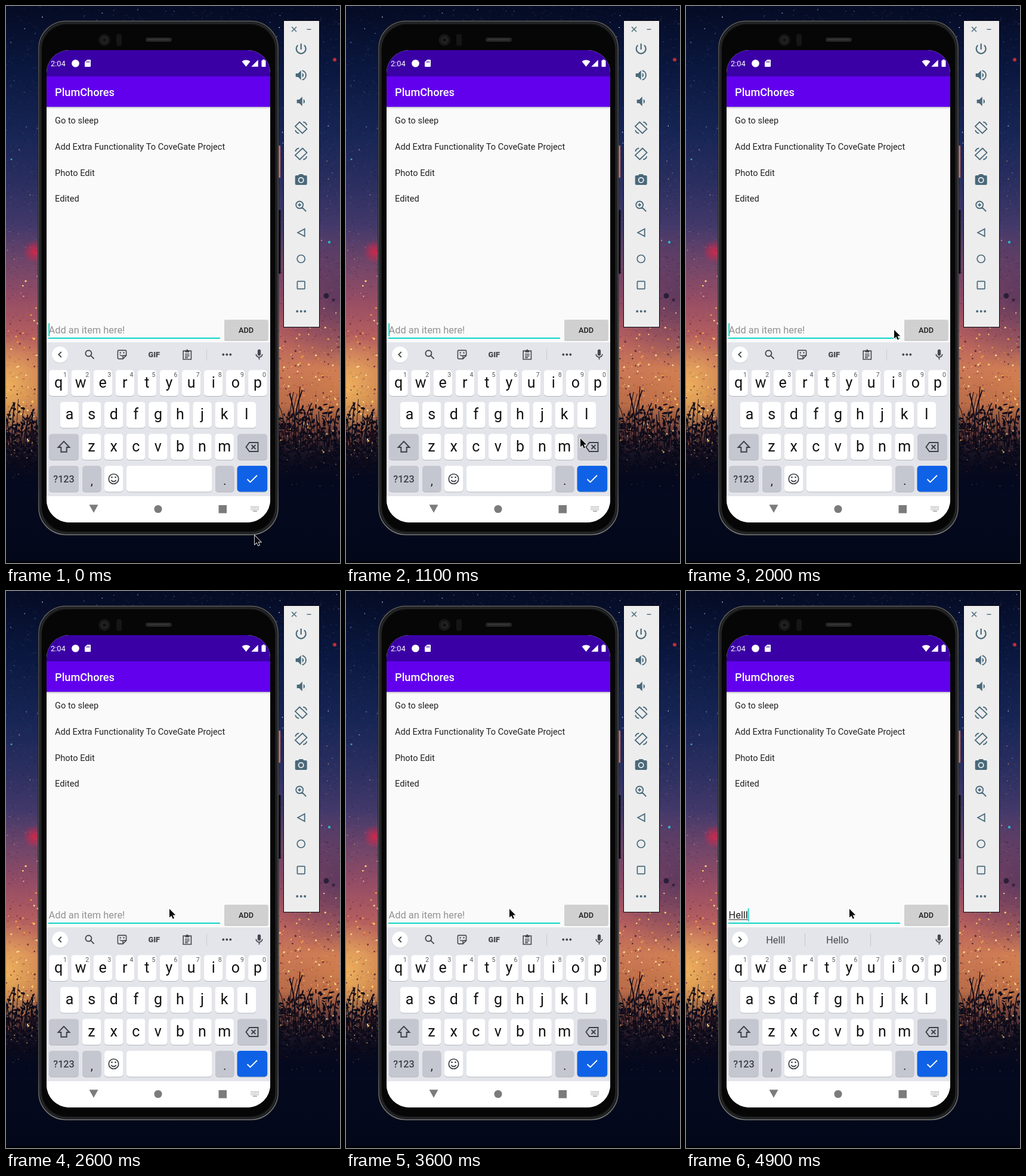
Animation of 560 by 934 pixels, one loop 5000 ms. Source, as an HTML page with a canvas:

```html
<!DOCTYPE html>
<html lang="en">
<head>
<meta charset="utf-8">
<title>Todo app</title>
<style>
html, body { margin: 0; width: 100%; height: 100%; overflow: hidden; background: #04081f; }
canvas { display: block; width: 100vw; height: 100vh; }
</style>
</head>
<body>
<canvas id="stage" width="560" height="934"></canvas>
<script>
const W = 560, H = 934, LOOP = 5000, STEP = 100;
const view = document.getElementById('stage').getContext('2d');
const base = document.createElement('canvas');
base.width = W;
base.height = H;
let g = base.getContext('2d');

let seed = 41;
const rnd = () => (seed = (seed * 16807) % 2147483647) / 2147483647;
const between = (a, b) => a + (b - a) * rnd();
const pick = list => list[Math.floor(rnd() * list.length)];

function rect(x, y, w, h, color, r = 0) {
  g.fillStyle = color;
  g.beginPath();
  g.roundRect(x, y, w, h, r);
  g.fill();
}
function ring(x, y, w, h, color, r, width = 1) {
  g.strokeStyle = color;
  g.lineWidth = width;
  g.beginPath();
  g.roundRect(x, y, w, h, r);
  g.stroke();
}
function dot(x, y, r, color) {
  g.fillStyle = color;
  g.beginPath();
  g.arc(x, y, r, 0, 7);
  g.fill();
}
function text(str, x, y, size, color, align = 'left', weight = 400) {
  g.font = `${weight} ${size}px Roboto, sans-serif`;
  g.textAlign = align;
  g.fillStyle = color;
  g.fillText(str, x, y);
}
// Icons are drawn in a 24-unit box centred on x, y.
function icon(x, y, color, { fill, line, width = 2, size = 24, flip = 1 }) {
  g.save();
  g.translate(x, y);
  g.scale(size / 24 * flip, size / 24);
  g.translate(-12, -12);
  g.fillStyle = g.strokeStyle = color;
  g.lineWidth = width;
  if (fill) g.fill(new Path2D(fill));
  if (line) g.stroke(new Path2D(line));
  g.restore();
}
function gradient(y0, y1, stops) {
  const grad = g.createLinearGradient(0, y0, 0, y1);
  stops.forEach(([at, color]) => grad.addColorStop((at - y0) / (y1 - y0), color));
  return grad;
}
function glow(x, y, r, rgb, alpha) {
  const grad = g.createRadialGradient(x, y, 0, x, y, r);
  grad.addColorStop(0, `rgba(${rgb},${alpha})`);
  grad.addColorStop(1, `rgba(${rgb},0)`);
  g.fillStyle = grad;
  g.fillRect(x - r, y - r, 2 * r, 2 * r);
}

function drawSky() {
  g.fillStyle = gradient(0, H, [
    [0, '#050b24'], [110, '#0a1840'], [220, '#182656'], [300, '#2b2f60'],
    [370, '#43396a'], [430, '#704569'], [490, '#944c65'], [550, '#b35d5f'],
    [610, '#cc7a55'], [670, '#b96c47'], [710, '#6e3f38'], [750, '#221a2a'],
    [800, '#050a20'], [H, '#030719']
  ]);
  g.fillRect(0, 0, W, H);
  glow(0, 640, 90, '255,205,100', .7);
  glow(560, 640, 70, '240,150,70', .25);
  glow(560, 490, 120, '60,45,90', .6);
  glow(48, 412, 20, '225,35,70', .85);

  for (let i = 0; i < 6000; i++) {
    const y = between(0, 700);
    g.fillStyle = rnd() < .5 ? 'rgba(0,0,20,.15)' : 'rgba(190,150,190,.09)';
    g.fillRect(between(0, W), y, between(1, 4), between(1, 2));
  }
  for (let i = 0; i < 420; i++) {
    const y = between(0, 460);
    const color = y < 230 ? pick(['#3a5c9a', '#6f93c4', '#cfdcec', '#28467f'])
                          : pick(['#c98a78', '#7777a8', '#e6b08a', '#54608f']);
    dot(between(0, W), y, between(.3, 1), color);
  }
  for (let i = 0; i < 1500; i++) {
    const y = 450 + 300 * Math.sqrt(rnd());
    const color = pick(['#ffd36e', '#f29b45', '#ffe29a', '#c85f3e', '#7c3440', '#5a2f40']);
    dot(between(0, W), y, between(.4, 1.7), color);
  }
  dot(551, 90, 3, '#c32b36');
  dot(542, 396, 2.2, '#28b9cc');
  dot(9, 257, 1.6, '#3c9cc9');
  dot(537, 486, 4.5, '#2a1f38');
  dot(549, 493, 2.5, '#35243d');
}

function drawGrass() {
  const dark = '#110c18';
  g.strokeStyle = dark;
  for (let x = -6; x < W + 8; x += 4) {
    const tall = between(20, 75) + (x > 462 && x < 492 ? 25 : 0);
    const lean = between(-18, 18);
    g.lineWidth = between(.7, 2.1);
    g.beginPath();
    g.moveTo(x, 740);
    g.quadraticCurveTo(x, 740 - tall * .7, x + lean, 732 - tall);
    g.stroke();
  }
  // Leaves thicken towards the ground.
  for (let i = 0; i < 3200; i++) {
    const y = 665 + 115 * Math.sqrt(rnd());
    g.fillStyle = pick([dark, '#080a19', '#1a111f']);
    g.beginPath();
    g.ellipse(between(0, W), y, between(1.5, 5), between(1, 2), between(0, 3), 0, 7);
    g.fill();
  }
  g.fillStyle = gradient(725, 815, [[725, 'rgba(5,8,25,0)'], [780, 'rgba(5,8,28,.75)'], [815, '#040920']]);
  g.fillRect(0, 725, W, 90);
  for (let i = 0; i < 260; i++) {
    dot(between(0, W), between(690, 805), between(.3, 1), pick(['#a76234', '#55303a', '#d99645', '#20203a']));
  }
  rect(0, 931, W, 3, '#010207');
}

function drawPhone() {
  rect(456, 234, 4, 54, '#df705a', 1);
  rect(456, 342, 4.5, 107, '#0b0b10', 1);
  rect(53.5, 24, 404, 864, '#161718', 47);
  ring(55, 25.5, 401, 861, gradient(24, 888, [[24, '#5c5e60'], [120, '#4a4c4e'], [800, '#4a4c4e'], [888, '#77797b']]), 45.5, 1.6);
  ring(58, 28.5, 395, 855, '#2c2d2f', 43, 1.5);
  rect(60, 31, 391, 850, '#060606', 42);
  dot(165, 57, 10, '#161617');
  dot(165, 57, 6, '#242426');
  dot(165, 57, 3, '#101012');
  rect(185, 47, 9, 20, '#151516', 4);
  rect(234, 53, 44, 7, '#252526', 3.5);
  rect(238, 55, 36, 2.5, '#343436', 1);
}

function drawApp() {
  rect(68, 74, 375, 792, '#fafafa');
  rect(68, 74, 375, 44, '#3a00a6');
  rect(68, 118, 375, 51, '#6200ee');
  rect(68, 169, 375, 4, gradient(169, 173, [[169, '#aeaab8'], [171, '#e6e6e8'], [173, '#fafafa']]));

  text('2:04', 75, 101, 12.8, '#fff');
  dot(116.5, 96.3, 6.3, '#fff');
  icon(137, 96, '#fff', { fill: 'M10 0h10a2 2 0 0 1 2 2v20a2 2 0 0 1-2 2H4a2 2 0 0 1-2-2V8zM8 5v5h2V5zM12 5v5h2V5zM16 5v5h2V5z', size: 12 });
  icon(402.5, 96, '#fff', { fill: 'M12 22L0 7a19 19 0 0 1 24 0z', size: 14 });
  icon(417, 96, '#fff', { fill: 'M0 24L24 0v24z', size: 11.5 });
  rect(428.5, 91, 7, 11, '#fff', 1);
  rect(430.5, 89.8, 3, 2, '#fff');

  text('PlumChores', 82, 151, 18.2, '#fff', 'left', 500);
  ['Go to sleep', 'Add Extra Functionality To CoveGate Project', 'Photo Edit', 'Edited']
    .forEach((item, i) => text(item, 82, 197 + i * 43.8, 14.6, '#212121'));

  rect(71, 556, 288, 2, '#0fd6c5');
  rect(366, 527.5, 73.5, 34, '#c3c3c4', 2);
  rect(366, 526, 73.5, 34, '#d0d0d0', 2);
  text('ADD', 402.5, 548, 12.8, '#1c1c1c', 'center', 500);
}

function key(x, y, w, color = '#fff') {
  rect(x, y + 1, w, 43.5, '#b3b5bc', 5);
  rect(x, y, w, 43.5, color, 5);
}
function letters(row, x, y, numbered) {
  [...row].forEach((ch, i) => {
    const cx = x + i * 37.1;
    key(cx - 15.8, y, 31.6);
    text(ch, cx, y + 29, 25, '#111', 'center');
    if (numbered) text((i + 1) % 10, cx + 14, y + 11, 10.5, '#55565a', 'right');
  });
}
function drawKeyboard() {
  const grey = '#c5c7d0', ink = '#3c3f44';
  rect(68, 564, 375, 258, '#e4e5eb');
  letters('qwertyuiop', 88, 610.5, true);
  letters('asdfghjkl', 106.5, 664, false);
  letters('zxcvbnm', 143.5, 717.5, false);
  key(72, 717.5, 50, grey);
  key(388, 717.5, 50, grey);
  icon(97, 739.5, ink, { line: 'M12 3L3 12.5h4.5V20h9v-7.5H21z', width: 1.9, size: 25 });
  icon(412.5, 739.5, ink, { line: 'M7.5 4.5H22v15H7.5L2 12zM11 8.5l7 7M18 8.5l-7 7', width: 1.9 });

  key(72, 771, 50, grey);
  key(128, 771, 31.5, grey);
  key(165, 771, 31.5);
  key(202, 771, 143.5);
  key(351, 771, 31.5, grey);
  key(387.6, 771, 50.6, '#0f62e6');
  text('?123', 97, 799, 16.2, ink, 'center', 500);
  text(',', 143.7, 803, 21, '#222', 'center');
  text('.', 366.7, 803, 21, '#222', 'center');
  icon(180.5, 793, ink, { line: 'M21 12a9 9 0 1 1-18 0a9 9 0 1 1 18 0M7.5 14a5 5 0 0 0 9 0', width: 1.9, size: 22 });
  dot(177.5, 790.3, 1.3, ink);
  dot(183.5, 790.3, 1.3, ink);
  icon(412.5, 793, '#fff', { line: 'M4 12.5l5 5L20.5 6', width: 1.8 });

  rect(68, 822, 375, 44, '#fff');
  icon(147, 843, '#7b7b7b', { fill: 'M3 4h18L12 20z', size: 20 });
  dot(255, 843.5, 6.6, '#7b7b7b');
  rect(356.5, 837, 13.5, 13.5, '#7b7b7b');
  for (let r = 0; r < 3; r++)
    for (let c = 0; c < 6; c++) rect(410.5 + c * 2.4, 839 + r * 2.5, 1.3, 1.3, '#8b8b8b');
  rect(414, 846.5, 7, 1.2, '#8b8b8b');
}

function drawToolbar() {
  const ink = '#49697a', x = 494.7;
  rect(465, 24, 61, 515, '#05060c');
  rect(466, 25, 59, 513, '#ededed');
  icon(483, 39, ink, { line: 'M4 4l16 16M20 4L4 20', width: 3, size: 12 });
  rect(504.5, 38.5, 7, 1.4, ink);
  icon(x, 72, ink, { line: 'M12 3v10M6.7 5.8a8 8 0 1 0 10.6 0', width: 2.2 });
  icon(x, 116, ink, { fill: 'M3 9v6h4l5 5V4L7 9zM14 8a4.5 4.5 0 0 1 0 8z', line: 'M14 4.2a8 8 0 0 1 0 15.6' });
  icon(x, 160, ink, { fill: 'M5 9v6h4l5 5V4L9 9zM16 8a4.5 4.5 0 0 1 0 8z' });
  const turn = { line: 'M9.5 2.5L21.8 14.2 14.2 21.5 2.2 9.8zM2.5 16a7 7 0 0 0 6 5.5M15.5 2.5a7 7 0 0 1 6 5.5', width: 1.8 };
  icon(x, 204, ink, turn);
  icon(x, 248, ink, { ...turn, flip: -1 });
  icon(x, 291, ink, { fill: 'M9 3L7.2 5H4a2 2 0 0 0-2 2v12a2 2 0 0 0 2 2h16a2 2 0 0 0 2-2V7a2 2 0 0 0-2-2h-3.2L15 3z' });
  dot(x, 292, 5, '#ededed');
  dot(x, 292, 3.2, ink);
  icon(x, 336, ink, { line: 'M15.5 9.5a6 6 0 1 1-12 0a6 6 0 1 1 12 0M14 14l6.5 6.5M9.5 6.7v5.6M6.7 9.5h5.6', width: 1.8 });
  icon(x, 380, ink, { line: 'M18 5.8v12.4L6.5 12z', width: 1.8 });
  icon(x, 424, ink, { line: 'M18.5 12a6.5 6.5 0 1 1-13 0a6.5 6.5 0 1 1 13 0', width: 1.7 });
  ring(x - 6.3, 461.7, 12.6, 12.6, ink, 1, 1.7);
  [-6.5, 0, 6.5].forEach(d => dot(x + d, 512, 2, ink));
}

function drawStrip(words) {
  const ink = '#45484d';
  dot(90.5, 585.3, 13.7, '#cfd0d6');
  dot(90.5, 584.5, 13.5, '#fff');
  icon(90.5, 584.5, ink, { line: 'M15 6l-6 6 6 6', size: 18, width: 2.4, flip: words ? -1 : 1 });
  icon(424.5, 584.5, ink, {
    fill: 'M9 5a3 3 0 0 1 6 0v6a3 3 0 0 1-6 0z',
    line: 'M6 11a6 6 0 0 0 12 0M12 17v4.5', size: 21
  });
  if (words) {
    rect(199, 574, 1, 22, '#c3c5cb');
    rect(309, 574, 1, 22, '#c3c5cb');
    words.forEach((word, i) => text(word, 150.3 + i * 103.6, 591, 16.4, ink, 'center'));
    return;
  }
  icon(140.5, 584.5, ink, { line: 'M15.5 9.5a6 6 0 1 1-12 0a6 6 0 1 1 12 0M14 14l6.5 6.5', size: 20, width: 2.3 });
  icon(194.5, 584.5, ink, { line: 'M5 3h14a2 2 0 0 1 2 2v9l-7 7H5a2 2 0 0 1-2-2V5a2 2 0 0 1 2-2M21 14h-5a2 2 0 0 0-2 2v5M7.5 12a4.5 4.5 0 0 0 6 2', size: 19 });
  dot(191.7, 581.5, 1.2, ink);
  dot(197.5, 581.5, 1.2, ink);
  text('GIF', 248.3, 589, 12.8, ink, 'center', 900);
  icon(303.8, 585, ink, {
    fill: 'M8 3h2a2 2 0 0 1 4 0h2v4H8z',
    line: 'M4 4h16v17H4zM7.5 10.5h9M7.5 14h9M7.5 17.5h6', size: 20, width: 1.9
  });
  rect(336, 575, 1, 20, '#c8cad0');
  [-6, 0, 6].forEach(d => dot(370.3 + d, 584.5, 1.9, ink));
}

const keys = [[3800, 'H'], [3900, 'He'], [4100, 'Hel'], [4500, 'Hell'], [4700, 'Helll']];
const moves = [
  [0, 417, 888], [200, 417, 888], [600, 386, 799], [900, 396, 902],
  [1300, 390, 548], [1800, 390, 548], [2300, 274, 533], [LOOP, 274, 533]
];

function pointerAt(t) {
  const i = moves.findIndex(m => m[0] > t);
  const [t0, x0, y0] = moves[i - 1], [t1, x1, y1] = moves[i];
  let k = (t - t0) / (t1 - t0);
  k = k * k * (3 - 2 * k);
  return [Math.round(x0 + (x1 - x0) * k), Math.round(y0 + (y1 - y0) * k)];
}

function drawField(t) {
  const last = keys.filter(k => k[0] <= t).pop();
  const typed = last ? last[1] : '';
  const lit = (t - (last ? last[0] : 0)) % 1000 < 500;
  drawStrip(!typed ? null : typed.length < 4 ? ['He', 'Hello', 'Hey'] : [typed, 'Hello']);
  text(typed || 'Add an item here!', 71.5, 549, 16.4, typed ? '#212121' : '#929292');
  const w = typed ? g.measureText(typed).width : 0;
  if (typed) rect(71.5, 550.5, w, 1, '#212121');
  if (lit) rect(71.3 + w, 532, 1.8, 22, '#0fd6c5');
}

function drawPointer(x, y) {
  const arrow = new Path2D('M0 0v14.6l3.4-3.1 2.4 5.3 2.2-1-2.4-5.2h4.7z');
  g.save();
  g.translate(x, y);
  g.lineWidth = 1.6;
  g.strokeStyle = '#fff';
  g.stroke(arrow);
  g.fillStyle = '#0a0a0a';
  g.fill(arrow);
  g.restore();
}

function buildBase() {
  drawSky();
  drawGrass();
  drawPhone();
  g.save();
  g.beginPath();
  g.roundRect(68, 74, 375, 792, 38);
  g.clip();
  drawApp();
  drawKeyboard();
  g.restore();
  drawToolbar();
}

buildBase();
g = view;
const start = performance.now();

function frame() {
  const ms = (performance.now() - start) % LOOP;
  const t = Math.floor(ms / STEP) * STEP;
  g.drawImage(base, 0, 0);
  drawField(t);
  drawPointer(...pointerAt(t));
  requestAnimationFrame(frame);
}
frame();
</script>
</body>
</html>
```
